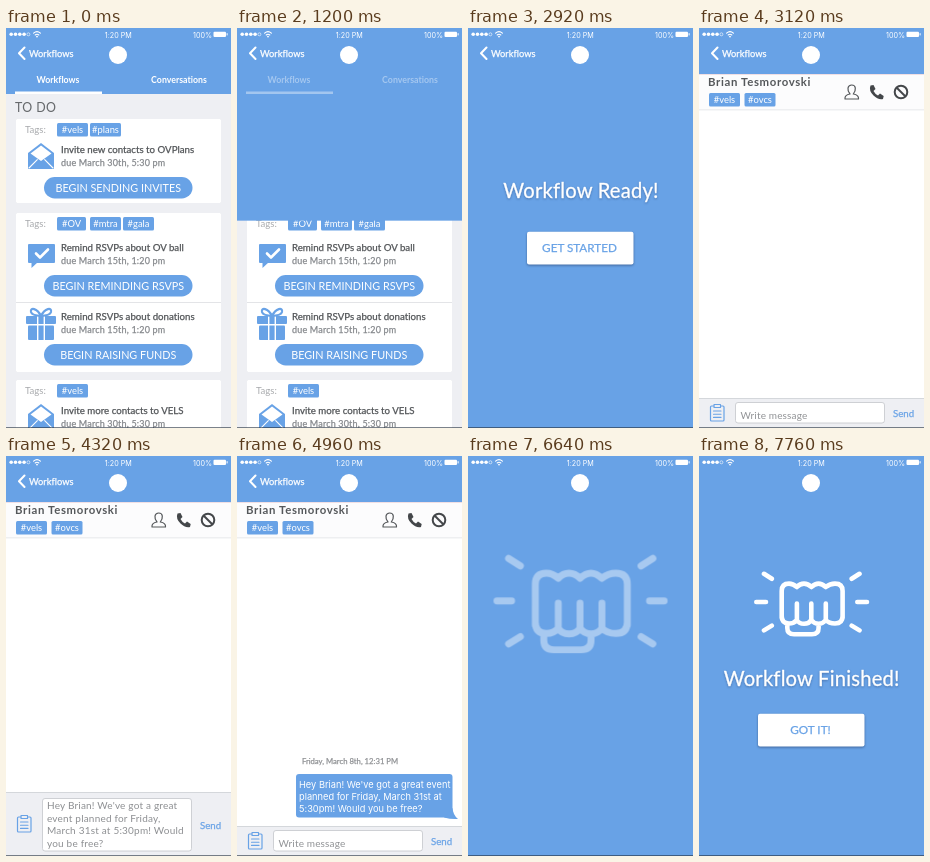
Recreate the animation shown at these times as an HTML page. Size 225 by 400 pixels, loop 8.6 s.

```html
<!DOCTYPE html>
<html lang="en">
<head>
<meta charset="utf-8">
<title>Workflow app</title>
<style>
html, body { margin: 0; width: 100%; height: 100%; overflow: hidden; background: #68a2e6; }
svg { display: block; width: 100vw; height: 100vh; }
text { font-family: Lato, "Open Sans", sans-serif; font-variant-ligatures: none; white-space: pre; stroke-width: 0; }
.sys { font-family: Inter, Roboto, sans-serif; }
.mid { text-anchor: middle; }
.bold { font-weight: 700; }
.semi { stroke-width: .25px; }
.title { font-size: 20.2px; letter-spacing: .2px; fill: #fff; stroke: #fff; stroke-width: .35px; text-anchor: middle; filter: drop-shadow(0 1px 1px rgba(30, 60, 110, .45)); }
.card { fill: #fff; filter: drop-shadow(0 .5px .7px rgba(0, 0, 0, .18)); }
.btn { fill: #fff; filter: drop-shadow(0 1px 1px rgba(20, 40, 80, .5)); }
.line { fill: none; stroke-linecap: round; stroke-linejoin: round; }
#fist { transform-origin: 112.8px 148px; }
</style>
</head>
<body>
<svg id="stage" viewBox="0 0 225 400" preserveAspectRatio="none"></svg>
<script>
const LOOP = 8600, BLUE = '#68a2e6';
const OUT = 'cubic-bezier(.215,.61,.355,1)', INOUT = 'ease-in-out';

const rect = (x, y, w, h, fill, r = 0, more = '') =>
  `<rect x="${x}" y="${y}" width="${w}" height="${h}" rx="${r}" fill="${fill}" ${more}/>`;
const text = (x, y, str, size, fill, cls = '', gap = 0) =>
  `<text x="${x}" y="${y}" font-size="${size}" fill="${fill}" stroke="${fill}" class="${cls}" letter-spacing="${gap}">${str}</text>`;
const path = (d, stroke, width) =>
  `<path class="line" d="${d}" stroke="${stroke}" stroke-width="${width}"/>`;
const shape = (d, fill) => `<path d="${d}" fill="${fill}"/>`;
const group = (id, body) => `<g id="${id}">${body}</g>`;
const at = (x, y, body) => `<g transform="translate(${x} ${y})">${body}</g>`;

const chip = (x, y, w, label) =>
  rect(x, y, w, 13.5, BLUE, 1.5) + text(x + w / 2, y + 10, label, 9.4, '#fff', 'mid');

const icons = {
  mail: shape('M0 10L13 0L26 10V26H0Z', BLUE) + shape('M2.5 10.5L13 2.4L23.5 10.5L13 18Z', '#fff') +
    path('M1 25L9.3 16.6M25 25L16.7 16.6', '#fff', 1.1),
  chat: rect(0, 3, 27, 19, BLUE, 1) + shape('M3.5 21V27L10 21Z', BLUE) + path('M8 12.5L12 16.5L20 8.5', '#fff', 2.6),
  gift: at(0, -2, rect(-2, 8, 30, 8, BLUE, 1) + rect(0, 17.5, 26, 14.5, BLUE, 1) + rect(9, 8, 1.4, 24, '#fff') +
    rect(15.6, 8, 1.4, 24, '#fff') +
    path('M13 8C9 0 2 -1 3 4Q4 7.5 13 8C17 0 24 -1 23 4Q22 7.5 13 8', BLUE, 2.2))
};

// One task: icon, two lines and an optional pill button
const task = (y, icon, title, due, action) =>
  at(22, y, icons[icon]) +
  text(55, y + 9.5, title, 9.7, '#505356', 'semi') +
  text(55, y + 23, `due March ${due} pm`, 9, '#85888c', 'semi', .18) +
  (action ? rect(38, y + 34, 148.5, 21.5, BLUE, 10.7) + text(112.3, y + 48.8, action, 10.8, '#fff', 'mid') : '');

const tags = (y, list) =>
  text(19, y, 'Tags:', 9.6, '#a9abae') + list.map(([x, w, s]) => chip(x, y - 10, w, s)).join('');

const listScreen =
  rect(0, 0, 225, 400, '#eeeff3') + rect(0, 0, 225, 66, BLUE) +
  text(9, 84, 'TO DO', 12.4, '#66696c', '', .4) +
  [[91, 84], [185, 159], [352, 60]].map(([y, h]) => rect(10, y, 205, h, '#fff', 1, 'class="card"')).join('') +
  tags(105, [[51, 31, '#vels'], [84, 31, '#plans']]) +
  task(115, 'mail', 'Invite new contacts to OVPlans', '30th, 5:30', 'BEGIN SENDING INVITES') +
  tags(199, [[51, 29, '#OV'], [84, 31, '#mtra'], [117, 31, '#gala']]) +
  task(213, 'chat', 'Remind RSVPs about OV ball', '15th, 1:20', 'BEGIN REMINDING RSVPS') +
  rect(10, 274, 205, .8, '#dcdee2') +
  task(282, 'gift', 'Remind RSVPs about donations', '15th, 1:20', 'BEGIN RAISING FUNDS') +
  tags(366, [[51, 31, '#vels']]) +
  task(376, 'mail', 'Invite more contacts to VELS', '30th, 5:30');

const tabs =
  text(52, 54.5, 'Workflows', 8.8, '#fff', 'mid bold') +
  text(173, 54.5, 'Conversations', 8.8, '#fff', 'mid bold') +
  rect(9, 63.5, 87, 2.5, '#fff');

const contact =
  rect(0, 46, 225, 36, '#fcfcfd') + rect(0, 46, 225, 1, '#f0dfe4') + rect(0, 81.5, 225, .8, '#e2e3e6') +
  text(9, 58, 'Brian Tesmorovski', 11.4, '#55585b', 'bold', .65) +
  chip(10, 65, 31, '#vels') + chip(45.5, 65, 31, '#ovcs') +
  path('M146 71Q145.5 67 151 66Q148.5 63 149 60Q149.5 57 152.7 57Q156 57 156.3 60Q156.7 63 154.3 66Q160 67 159.5 71Z', '#55585b', 1.2) +
  shape('M171.5 57.5L174.5 57L176.5 61L174.5 63Q176 66 179 67.5L181 65.5L184.7 68L184 71Q179 72 174.5 67.5Q169.5 62.5 171.5 57.5Z', '#44474a') +
  '<circle cx="202" cy="64" r="6.3" fill="none" stroke="#44474a" stroke-width="2"/>' +
  path('M198 60L206 68', '#44474a', 2);

const draftLines = ["Hey Brian! We've got a great", 'event planned for Friday,', 'March 31st at 5:30pm! Would', 'you be free?'];
const sentLines = ["Hey Brian! We've got a great event", 'planned for Friday, March 31st at', '5:30pm! Would you be free?'];

const clipboard =
  path('M15 378H12.5Q11.5 378 11.5 379V392Q11.5 393 12.5 393H24Q25 393 25 392V379Q25 378 24 378H21.5', BLUE, 1.2) +
  path('M15 376.5H21.5V379.5H15ZM14.5 383H22M14.5 386.2H22M14.5 389.4H22', BLUE, 1.1);

const chatScreen =
  rect(0, 0, 225, 400, '#fff') + rect(0, 0, 225, 46, BLUE) + contact +
  group('sent',
    text(113, 307.5, 'Friday, March 8th, 12:31 PM', 7.7, '#8f9194', 'mid semi') +
    rect(59, 318, 156.5, 43.5, BLUE, 3) + shape('M207 361.5L215.5 352Q216 359 221 363Q214 363.5 207 361.5Z', BLUE) +
    sentLines.map((s, i) => text(62, 332 + i * 12, s, 9.25, '#fff', 'sys')).join('')) +
  group('bar', rect(0, 370, 225, 90, '#eeeff3') + rect(0, 370, 225, .8, '#cfd1d6')) +
  rect(36.5, 374.5, 149, 20.5, '#fff', 2.5, 'id="field" stroke="#c9cbd0" stroke-width=".9"') +
  group('hint', text(41.5, 390.5, 'Write message', 10, '#909295', '', .15)) +
  group('draft', draftLines.map((s, i) => text(41, 353 + i * 12.6, s, 10, '#8d8f92', '', .2)).join('')) +
  group('clip', clipboard) + group('send', text(194, 388.5, 'Send', 9.7, BLUE, 'semi'));

const button = (id, y, label) =>
  group(id, rect(59, y, 106.5, 32.7, '#fff', 2, 'class="btn"') + text(111.5, y + 20.5, label, 11.7, BLUE, 'mid semi'));

const knuckles = 'M82.7 162V135Q82.7 127.6 90 127.6Q94 127.6 97.9 131Q101 127.6 105 127.6Q109 127.6 112.3 131' +
  'Q116 127.6 119.6 127.6Q123 127.6 126.8 131Q131 127.6 136 127.6Q143.6 127.6 143.6 135V162';
const fingers = 'M82.7 160Q82.7 167.5 90 167.5Q95 167.5 97.9 164V147.5M97.9 164Q100 167.8 105.1 167.8Q110 167.8 112.3 164V147.5' +
  'M112.3 164Q115 167.8 119.6 167.8Q124 167.8 126.8 164V147.5M126.8 164Q130 167.5 136 167.5Q143.6 167.5 143.6 160';
const thumb = 'M88.3 168V172Q88.3 178.3 95 178.3H113Q119.6 178.3 119.6 172V168';
const rays = 'M57.3 146H67M65 117.8L72.8 122.8M65 174.4L72.8 169.6M168 146H158.3M160.5 117.8L152.7 122.8M160.5 174.4L152.7 169.6';

const wifi = path('M27.6 5.2Q31 2 34.4 5.2M29.2 7Q31 5.4 32.8 7', '#fff', 1.1) + '<circle cx="31" cy="8.6" r=".9" fill="#fff"/>';
const dots = [0, 1, 2, 3, 4].map(i =>
  `<circle cx="${5.2 + i * 4.3}" cy="6.3" r="${i < 4 ? 1.8 : 1.5}" fill="${i < 4 ? '#fff' : 'none'}" stroke="#fff" stroke-width="${i < 4 ? 0 : .6}"/>`).join('');
const status = dots + wifi +
  text(112.3, 9.5, '1:20 PM', 7.2, '#fff', 'sys mid') + text(187, 9.5, '100%', 7.2, '#fff', 'sys') +
  rect(207.5, 3.7, 12.5, 5.2, '#fff', 1) + rect(220.6, 5.2, 1, 2.2, '#fff');

document.getElementById('stage').innerHTML =
  listScreen + group('chat', chatScreen) +
  group('ready', rect(0, 0, 225, 400, BLUE) +
    group('readyText', '<text class="title" x="113" y="170">Workflow Ready!</text>') +
    button('start', 203.7, 'GET STARTED')) +
  group('tabs', tabs) +
  group('done', rect(0, 0, 225, 400, BLUE) +
    group('fist', path(knuckles + fingers + thumb + rays, '#fff', 4.6)) +
    group('doneText', '<text class="title" x="112.7" y="230">Workflow Finished!</text>') +
    button('gotIt', 257.7, 'GOT IT!')) +
  group('back', path('M18.5 19.5L13 25.2L18.5 31', '#fff', 2) + text(23, 28.8, 'Workflows', 9.3, '#fff', 'semi')) +
  group('head', status + '<circle cx="112" cy="27" r="9" fill="#fff"/>') +
  rect(0, 399, 225, 1, '#23303f', 0, 'opacity=".6"');

// Steps are [ms, value, easing towards the next step]
function play(id, prop, steps, wrap = v => v) {
  const all = [[0, steps[0][1]], ...steps, [LOOP, steps[steps.length - 1][1]]];
  const frames = all.map(([ms, v, easing = 'linear']) => ({ offset: ms / LOOP, [prop]: wrap(v), easing }));
  document.getElementById(id).animate(frames, { duration: LOOP, iterations: Infinity });
}
const fade = (id, ...steps) => play(id, 'opacity', steps);
const slide = (id, ...steps) => play(id, 'transform', steps, v => `translateY(${v}px)`);
const px = v => v + 'px';

// Work list to "ready" sheet
fade('tabs', [1080, 1], [1280, 0]);
slide('ready', [1080, -334, OUT], [1935, 0], [2960, 0, INOUT], [3120, -400]);
fade('readyText', [1240, 0], [1700, 1]);
fade('start', [2000, 0], [2320, 1]);

// Conversation: template fills the field, then is sent
fade('chat', [2400, 0], [2400, 1]);
const grow = [4160, 4320], shrink = [4730, 4960];
const swell = (a, b) => [[grow[0], a, OUT], [grow[1], b], [shrink[0], b, OUT], [shrink[1], a]];
slide('bar', ...swell(0, -34));
slide('clip', ...swell(0, -17));
slide('send', ...swell(0, -16));
play('field', 'y', swell(374.5, 342.5), px);
play('field', 'height', swell(20.5, 52.5), px);
fade('hint', [4160, 1], [4240, 0], [4840, 0], [4940, 1]);
fade('draft', [4180, 0], [4320, 1], [4730, 1], [4820, 0]);
slide('sent', [4730, 36, OUT], [4960, 0]);
fade('sent', [4730, 0], [4920, 1]);

// "Finished" sheet
slide('done', [6360, -400, OUT], [6536, 0]);
fade('back', [6390, 1], [6390, 0]);
fade('head', [6390, 1], [6390, 0], [6440, 0], [6560, 1]);
play('fist', 'transform', [[6558, 1.88, OUT], [7080, 1]], v => `scale(${v})`);
fade('fist', [6558, 0, OUT], [7080, 1]);
fade('doneText', [6720, 0], [7080, 1]);
fade('gotIt', [7560, 0], [7760, 1]);
</script>
</body>
</html>
```
